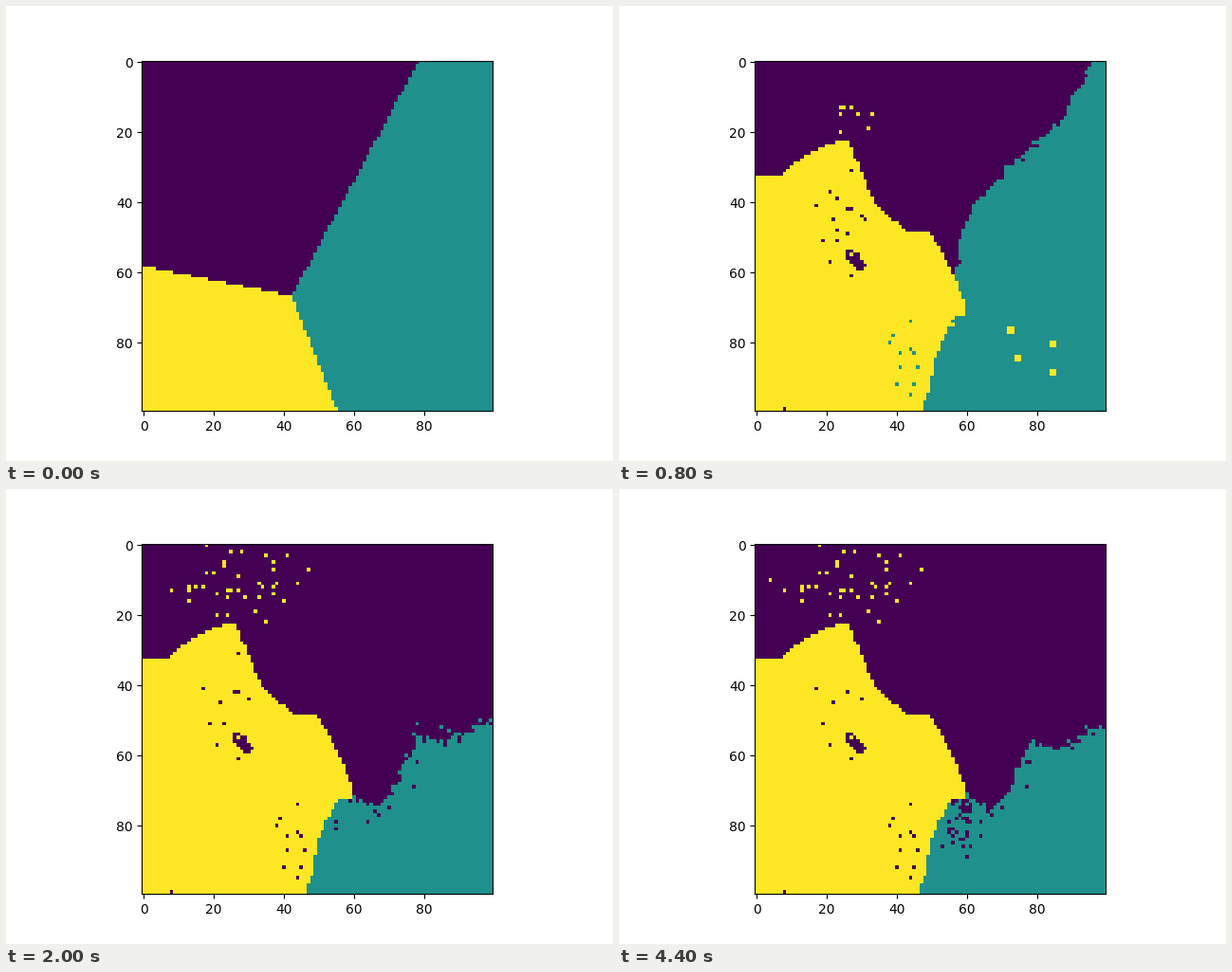
A matplotlib script that plays this animation: 640 by 480 pixels, repeating every 4800 ms.

```python
import numpy as np
import matplotlib.pyplot as plt
from matplotlib.animation import FuncAnimation
from matplotlib.path import Path

N, FRAMES, STEP, LAST = 100, 24, 200, 22
PURPLE, TEAL, YELLOW = 0, 1, 2

rng = np.random.default_rng(11)
y, x = np.mgrid[0:N, 0:N] + 0.5
cells = np.column_stack([x.ravel(), y.ravel()])
noise = rng.normal(size=cells.shape) * rng.choice([0.6, 2], (N * N, 1), p=[0.75, 0.25])
fringe = noise * np.clip((cells[:, :1] - 55) / 25, 0.2, 1)  # rougher to the right
fine = rng.random((N, N))
coarse = np.kron(rng.random((N // 2, N // 2)), np.ones((2, 2)))

# Outline of the yellow cluster, from the left edge round to the bottom
YELLOW_START = [(-1, 58.5), (42.8, 67.3), (55.9, 100)]
YELLOW_END = [(-1, 33.3), (7, 33.3), (11, 29.5), (18.5, 25), (24, 23.4), (27, 23.4),
              (34, 40.5), (43, 48.6), (50, 49.2), (54, 56), (57, 62.3), (60, 69.5),
              (60, 72.6), (56, 73), (50, 85), (48.6, 95), (46.4, 100)]

# Edge between purple and teal: frame -> (roughness, points)
TEAL_EDGES = {
    0: (0, [(42.8, 67.3), (79.7, -1)]),
    2: (0.8, [(53.5, 54), (52, 50), (54.6, 40), (58.7, 28.5), (66, 21.5),
              (70.5, 13), (79, 0)]),
    4: (0.6, [(56, 62), (58.5, 57), (58, 51), (63, 41), (73, 30), (87, 18), (97, -1)]),
    6: (1, [(58, 64.5), (61.5, 64.5), (67, 48), (81, 42.8), (91, 38.4), (101, 33)]),
    10: (1.2, [(60, 71), (61.5, 74), (67, 75.6), (72, 70.5), (76, 60), (80, 55.6),
               (87, 56.5), (101, 50)]),
    14: (1, [(60, 70), (62, 74), (67.5, 76), (73.5, 69.5), (77, 60), (80, 57),
             (89, 59), (94.5, 54), (101, 52)]),
}


def resample(points, count=160):
    p = np.array(points, float)
    s = np.append(0, np.cumsum(np.hypot(*np.diff(p, axis=0).T)))
    t = np.linspace(0, s[-1], count)
    return np.column_stack([np.interp(t, s, p[:, 0]), np.interp(t, s, p[:, 1])])


def blend(a, b, t):
    return (1 - t) * resample(a) + t * resample(b)


def inside(edge, corners, where):
    return Path(np.vstack([edge, corners])).contains_points(where).reshape(N, N)


def haze(cx, cy, w, h):
    return np.exp(-((x - cx) / w) ** 2 - ((y - cy) / h) ** 2)


def yellow_area(i):
    if i == 0:
        return inside(YELLOW_START, [(-1, 100)], cells)
    # the lower right side draws back over the first second
    bulge = 2 * np.clip((7 - i) / 5, 0, 1)
    end = [(px + bulge * (py > 72.8), py) for px, py in YELLOW_END]
    edge = end if i > 1 else blend(YELLOW_START, end, 0.6)
    return inside(edge, [(-1, 100)], cells + 0.15 * noise)


def teal_area(i):
    keys = list(TEAL_EDGES)
    i = min(i, keys[-1])
    k = max(n for n, key in enumerate(keys[:-1]) if key <= i)
    a, b = keys[k:k + 2]
    t = (i - a) / (b - a)
    (rough_a, edge_a), (rough_b, edge_b) = TEAL_EDGES[a], TEAL_EDGES[b]
    edge = blend(edge_a, edge_b, t)
    rough = (1 - t) * rough_a + t * rough_b
    corners = [(110, edge[-1, 1]), (110, 110), (36, 110), (36, edge[0, 1])]
    return inside(edge, corners, cells + rough * fringe)


wedge = haze(59, 79, 4, 6)
islands = coarse / haze(72, 83, 14, 8)
sparks = fine < 0.09 * haze(28, 13, 14, 9)
spark_birth = 1 + np.hypot(x - 29, y - 18) / 2.4
strays = fine / haze(27, 46, 5, 12)
specks = fine < 0.1 * haze(43, 84, 3, 10)
along, across = x + y - 86, x - y + 28.5
blob = ((along / 6) ** 2 + (across / 2.4) ** 2 < 1) & (fine < 0.85)


def labels(i):
    grid = np.where(teal_area(i), TEAL, PURPLE)
    grid[(grid == TEAL) & (fine < 0.45 * wedge * np.clip((i - 9) / 8, 0, 1))] = PURPLE
    grid[yellow_area(i)] = YELLOW
    if i == 0:
        return grid
    purple, teal, yellow = (grid == c for c in (PURPLE, TEAL, YELLOW))
    decay = np.exp(-(i - 1) / 3)
    grid[purple & sparks & (spark_birth <= i)] = YELLOW
    grid[teal & (islands < 0.008 + 0.15 * decay)] = YELLOW
    grid[yellow & (blob | (strays < 0.03 + 0.14 * decay))] = PURPLE
    grid[yellow & specks] = TEAL if i < 8 else PURPLE
    return grid


fig, ax = plt.subplots(figsize=(6.4, 4.8), dpi=100)
image = ax.imshow(labels(0), cmap="viridis", vmin=0, vmax=2, interpolation="nearest")


def draw(i):
    image.set_data(labels(min(i, LAST)))
    return [image]


anim = FuncAnimation(fig, draw, frames=FRAMES, interval=STEP, repeat=True)
plt.show()
```
